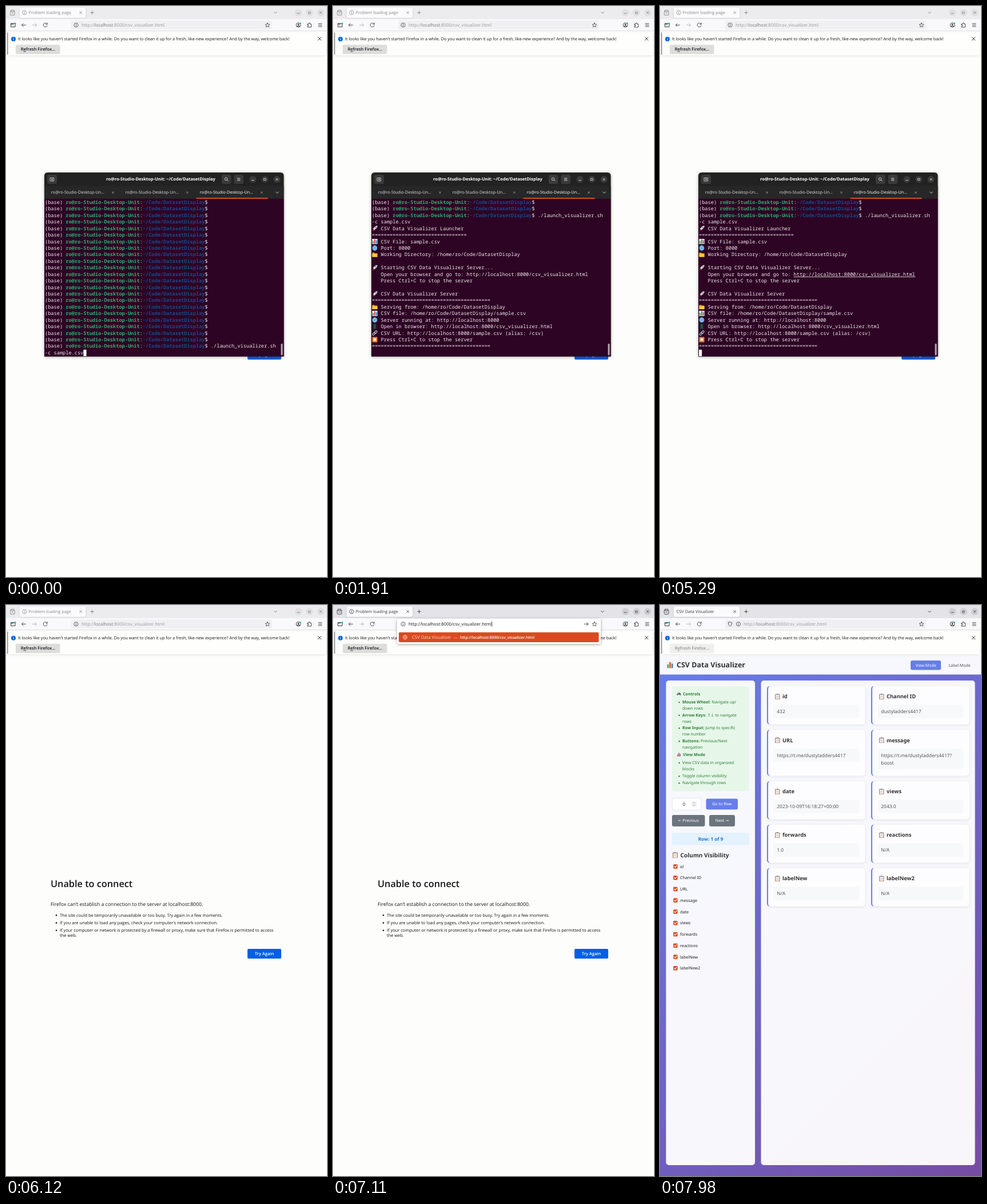
These frames come from a looping animation (561x998 px, 8 s). An HTML page:

```html
<!DOCTYPE html>
<html lang="en">
<head>
<meta charset="utf-8">
<title>CSV Data Visualizer</title>
<style>
html, body { margin: 0; width: 100%; height: 100%; overflow: hidden; background: #fdfdfb; }
svg { display: block; }
text { white-space: pre; text-rendering: geometricPrecision; font-family: "Open Sans", "Noto Sans", sans-serif; }
.mono text { font-family: "Noto Sans Mono", "DejaVu Sans Mono", monospace; }
.app text { font-family: "Noto Sans", "Open Sans", sans-serif; }
.arrow { font-family: "DejaVu Sans", sans-serif; }
</style>
</head>
<body>
<svg id="stage" width="561" height="998" viewBox="0 0 561 998">
  <defs>
    <linearGradient id="sky" gradientUnits="userSpaceOnUse" x1="-87" y1="176" x2="648" y2="911">
      <stop offset="0" stop-color="#667eea"/><stop offset="1" stop-color="#764ba2"/>
    </linearGradient>
    <filter id="soft" x="-10%" y="-10%" width="120%" height="125%">
      <feDropShadow dx="0" dy="1" stdDeviation="2.5" flood-opacity=".35"/>
    </filter>
    <filter id="faint" x="-10%" y="-10%" width="120%" height="130%">
      <feDropShadow dx="0" dy="1" stdDeviation="2" flood-opacity=".1"/>
    </filter>
    <symbol id="rocket" viewBox="0 0 10 10">
      <path d="M2.6 4 .8 5.8 3 6zM6 7.4 4.2 9.2 4 7z" fill="#d8343c"/>
      <path d="M9.6.4C6 .4 3.6 2.8 2.3 6.2L3.8 7.7C7.2 6.4 9.6 4 9.6.4z" fill="#cfd8dc"/>
      <circle cx="6.7" cy="3.3" r="1.1" fill="#2f7fb8"/>
      <path d="M2.6 7.2.6 9.5 3 8.2z" fill="#f9a825"/>
    </symbol>
    <symbol id="chart" viewBox="0 0 10 10">
      <rect x=".3" y=".3" width="9.4" height="9.4" rx=".6" fill="#eef2f4"/>
      <path d="M1.3 4h1.9v5H1.3z" fill="#3fa34d"/><path d="M4.1 1.2H6V9H4.1z" fill="#d9433b"/><path d="M6.9 3h1.9v6H6.9z" fill="#2c7fc4"/>
    </symbol>
    <symbol id="globe" viewBox="0 0 10 10">
      <circle cx="5" cy="5" r="4.5" fill="#2f8fd0"/>
      <path d="M.5 5h9M5 .5v9M1.3 2.7h7.4M1.3 7.3h7.4M5 .5C1.5 3 1.5 7 5 9.5 8.5 7 8.5 3 5 .5" fill="none" stroke="#bfe3f7" stroke-width=".6"/>
    </symbol>
    <symbol id="folder" viewBox="0 0 10 10">
      <path d="M.5 1.5H4l1 1.2h4.5V9h-9z" fill="#e0a21c"/><path d="M.5 3.8h9V9h-9z" fill="#ffca3a"/>
    </symbol>
    <symbol id="phone" viewBox="0 0 10 10">
      <rect x="2.3" y=".3" width="5.4" height="9.4" rx=".8" fill="#26363c"/><rect x="3" y="1.4" width="4" height="7" fill="#0b5c45"/>
    </symbol>
    <symbol id="link" viewBox="0 0 10 10">
      <g fill="none" stroke="#a9bac2" stroke-width="1.3" transform="rotate(-45 5 5)">
        <rect x="0" y="3.5" width="5.5" height="3" rx="1.5"/><rect x="4.5" y="3.5" width="5.5" height="3" rx="1.5"/>
      </g>
    </symbol>
    <symbol id="stop" viewBox="0 0 10 10">
      <rect x=".4" y=".4" width="9.2" height="9.2" rx="1" fill="#f57c1f"/><rect x="2.8" y="2.8" width="4.4" height="4.4" fill="#fff"/>
    </symbol>
    <symbol id="pad" viewBox="0 0 10 10">
      <path d="M2.5 2.5h5C9 2.5 10 8 8.7 8.2 7.7 8.3 7 6.5 6.5 6.5h-3C3 6.5 2.3 8.3 1.3 8.2 0 8 1 2.5 2.5 2.5z" fill="#56646b"/>
      <path d="M2 4.5h2M3 3.5v2" stroke="#fff" stroke-width=".6"/><circle cx="7" cy="4.5" r=".8" fill="#d9433b"/>
    </symbol>
    <symbol id="clip" viewBox="0 0 10 10">
      <rect x="1" y=".9" width="8" height="8.9" rx=".7" fill="#b5734c"/><path d="M2 2h6v7H2z" fill="#f4f6f7"/>
      <path d="M3.4.2h3.2v2H3.4z" fill="#8d9aa1"/><path d="M3 4h4M3 5.5h4M3 7h4" stroke="#9fb0b8" stroke-width=".5"/>
    </symbol>
  </defs>
</svg>
<script>
const LOOP = 8000;

const text = (x, cy, s, size, fill = "#15141a", more = "") =>
  `<text x="${x}" y="${cy + size * .35}" font-size="${size}" fill="${fill}" ${more}>${s}</text>`;
const box = (x, y, x2, y2, fill, r = 0, more = "") =>
  `<rect x="${x}" y="${y}" width="${x2 - x}" height="${y2 - y}" rx="${r}" fill="${fill}" ${more}/>`;
const dot = (x, y, r, fill, more = "") => `<circle cx="${x}" cy="${y}" r="${r}" fill="${fill}" ${more}/>`;
const line = (d, color = "#3b3b40", w = .9) =>
  `<path d="${d}" fill="none" stroke="${color}" stroke-width="${w}" stroke-linecap="round" stroke-linejoin="round"/>`;
const cross = (x, y, r, color, w) => line(`M${x - r} ${y - r}l${2 * r} ${2 * r}m0 ${-2 * r}l${-2 * r} ${2 * r}`, color, w);
const plus = (x, y, r, color) => line(`M${x - r} ${y}h${2 * r}M${x} ${y - r}v${2 * r}`, color);
const chevron = (x, y, color) => line(`M${x - 2.5} ${y - 1.2}l2.5 2.5 2.5-2.5`, color);
const arrow = (x, y, dir, color) => line(`M${x - 3.5 * dir} ${y}h${7 * dir}m${-2.8 * dir}-2.8l${2.8 * dir} 2.8 ${-2.8 * dir} 2.8`, color);
const icon = (id, x, cy, size) => `<use href="#${id}" x="${x}" y="${cy - size / 2}" width="${size}" height="${size}"/>`;
const info = (x, y, color) => dot(x, y, 3.6, "none", `stroke="${color}" stroke-width=".8"`) +
  line(`M${x} ${y - .3}v1.9M${x} ${y - 1.8}v.1`, color, .9);
const layer = (id, body, cls = "") => `<g id="${id}" class="${cls}">${body}</g>`;
const glyph = s => `<tspan class="arrow">${s}</tspan>`;
const MID = 'text-anchor="middle"', BOLD = 'font-weight="700"', SEMI = 'font-weight="600"', MEDIUM = 'font-weight="500"';

const INK = "#3b3b40", BLUE = "#667eea", ORANGE = "#da4a20";
const HOST = "localhost:8000", PAGE = `http://${HOST}/csv_visualizer.html`;

function star(x, y, r) {
  let d = "";
  for (let i = 0; i < 10; i++) {
    const a = Math.PI * (i / 5 - .5), q = i % 2 ? r * .48 : r;
    d += (i ? "L" : "M") + (x + q * Math.cos(a)).toFixed(2) + " " + (y + q * Math.sin(a)).toFixed(2);
  }
  return line(d + "z", INK, .8);
}

function errorPage() {
  const points = [[542, "The site could be temporarily unavailable or too busy. Try again in a few moments."],
    [555.3, "If you are unable to load any pages, check your computer’s network connection."],
    [568.5, "If your computer or network is protected by a firewall or proxy, make sure that Firefox is permitted to access"]];
  return text(78, 487.7, "Unable to connect", 16.3, "#15141a", SEMI) +
    text(78, 522.5, `Firefox can’t establish a connection to the server at ${HOST}.`, 8.64) +
    points.map(([y, s]) => dot(88, y + .3, 1.3, "#15141a") + text(94, y, s, 7.44)).join("") +
    text(94, 577.8, "the web.", 7.44) +
    box(422, 601, 481, 618, "#0060e4", 2) + text(451.5, 609.5, "Try Again", 7.5, "#fff", MID + " " + SEMI);
}

function visualizer() {
  const green = "#2e7d32";
  const help = [[169.7, "Mouse Wheel:", "Navigate up/"], [180.7, "", "down rows"],
    [192.5, "Arrow Keys:", glyph("↑↓") + " to navigate"], [203.5, "", "rows"],
    [215, "Row Input:", "Jump to specific"], [226, "", "row number"],
    [238, "Buttons:", "Previous/Next"], [249, "", "navigation"],
    [275.7, "-", "View CSV data in organized"], [287, "", "blocks"],
    [299, "-", "Toggle column visibility"], [311, "-", "Navigate through rows"]];
  const fields = ["id", "Channel ID", "URL", "message", "date", "views", "forwards", "reactions", "labelNew", "labelNew2"];
  const button = (x, y, x2, y2, s, fill) => box(x, y, x2, y2, fill, 3) +
    text((x + x2) / 2, (y + y2) / 2, s, 7.1, "#fff", MID + " " + MEDIUM);

  const side = box(10.5, 132, 166, 979, "#fff", 5, 'fill-opacity=".95"') +
    box(21, 142.5, 156, 325.5, "#e6f7ea", 3) +
    icon("pad", 29, 155.5, 8) + text(40, 155.5, "Controls", 7.2, green, BOLD) +
    icon("chart", 29, 261.5, 8) + text(40, 261.5, "View Mode", 7.2, green, BOLD) +
    help.map(([y, head, s]) => (head ? dot(33.5, y + .3, 1.2, green) : "") +
      text(39, y, (head.length > 1 ? `<tspan font-weight="700">${head}</tspan> ` : "") + s, 7.1, green)).join("") +
    box(21.3, 337.3, 72, 358.5, "#fff", 3, 'stroke="#dcdce4" stroke-width=".7"') +
    text(42, 348, "0", 7.6, "#222", MID) +
    box(55, 343, 64, 353, "#f0f0f2", 1) + line("M58 346.5l1.5-1.5 1.5 1.5M58 349.5l1.5 1.5 1.5-1.5", "#8a8a90", .7) +
    button(80.5, 338.5, 136, 357.5, "Go to Row", BLUE) +
    button(21, 367, 78.5, 387, glyph("←") + " Previous", "#6c757d") +
    button(86, 367, 131, 387, "Next " + glyph("→"), "#6c757d") +
    box(21, 398, 156, 419.5, "#e3f2fd", 3) + text(88.5, 408.7, "Row: 1 of 9", 8.2, "#1976d2", MID + " " + BOLD) +
    icon("clip", 21, 437, 11) + text(35.5, 437, "Column Visibility", 10.1, "#333", BOLD);

  const checks = fields.map((name, i) => {
    const y = 457 + i * 19.75;
    return box(23.3, y - 3.7, 30.7, y + 3.7, ORANGE, 1.2) +
      line(`M25 ${y}l1.5 1.6 2.7-3.2`, "#fff", 1.1) + text(35, y, name, 7.2, "#222");
  }).join("");

  const link = "https://t.me/dustyladders4417";
  const values = [["432"], ["dustyladders4417"], [link], [link + "?", "boost"],
    ["2023-10-09T16:18:27+00:00"], ["2043.0"], ["1.0"], ["N/A"], ["N/A"], ["N/A"]];
  const tops = [142, 218.3, 308, 384, 460];
  const cards = values.map((rows, i) => {
    const x = i % 2 ? 369 : 187, r = i >> 1, y = tops[r], h = r === 1 ? 80 : 66.5;
    return box(x + 1, y, x + 171.5, y + h, "#fdfdff", 5, 'filter="url(#faint)"') +
      `<path d="M${x + 5} ${y}q-5 0-5 5v${h - 10}q0 5 5 5-3-1-3-5V${y + 5}q0-4 3-5z" fill="${BLUE}"/>` +
      icon("clip", x + 13, y + 18, 10.5) + text(x + 27, y + 18, fields[i], 9.3, "#333", BOLD) +
      box(x + 11.5, y + 32.5, x + 161, y + 43 + 13 * rows.length, "#f7f8fa", 2) +
      rows.map((s, k) => text(x + 17.3, y + 44.3 + 13.3 * k, s, 8.4, "#555")).join("");
  }).join("");

  return box(0, 89, 561, 998, "url(#sky)") + box(0, 89, 561, 121.5, "#fff", 0, 'fill-opacity=".95"') +
    icon("chart", 11, 105, 13) + text(29, 105, "CSV Data Visualizer", 12.5, "#333", BOLD) +
    box(438, 97, 491, 113.5, BLUE, 3) + text(464.7, 105.2, "View Mode", 7, "#fff", MID + " " + MEDIUM) +
    text(523.5, 105.2, "Label Mode", 7, "#495057", MID) +
    side + layer("checks", checks) +
    box(176.5, 132, 550.5, 979, "#fff", 5, 'fill-opacity=".95"') + layer("cards", cards);
}

function browser() {
  const strip = line("M7.5 9.5H15V15a1 1 0 0 1-1 1H8.5a1 1 0 0 1-1-1zM8.5 9.5V7.3H14v2.2M10 12.2h2.5", INK, .9) +
    layer("oldTab", info(32.5, 11.5, INK) + text(39.5, 11.5, "Problem loading page", 7.31, INK)) +
    layer("newTab", text(28.5, 11.5, "CSV Data Visualizer", 7.45, INK)) +
    cross(130.7, 11.5, 1.9, INK) + plus(150.5, 11.5, 2.8, INK) + chevron(471, 11.5, INK) +
    [511, 530.5, 550].map(x => dot(x, 11.5, 6.3, "#000", 'fill-opacity=".09"')).join("") +
    line("M509 13h4", INK) + line("M529 10.3h3v3h-3z", INK, .8) + cross(550, 11.5, 1.8, INK);

  const nav = line("M9 30.5h7v6H9zM9 32h4", INK, 1) + dot(16, 30.5, 1.5, "#17b6b0") +
    arrow(31, 33.3, -1, INK) + arrow(50, 33.3, 1, "#b4b4ba") +
    line("M71.7 31.5a3.5 3.5 0 1 0 .3 2.8M72.2 29.7V32h-2.3", INK) +
    dot(511, 33.3, 3.9, "none", `stroke="${INK}" stroke-width=".9"`) + dot(511, 32.2, 1.3, INK) +
    line("M508.9 35.6q2.1-2 4.2 0", INK, 1.2) + dot(514.5, 30.2, 1.3, "#17b6b0") +
    line("M527 31.5h2.2q-.5-2.3 1.1-2.3t1.1 2.3h2.1V37H527v-1.9q2 .3 2-1t-2-1z", INK) +
    line("M546 30.7h6M546 33.3h6M546 35.9h6", INK);

  const welcome = "It looks like you haven’t started Firefox in a while. Do you want to clean it up for a fresh, like-new experience? And by the way, welcome back!";
  const bar = box(2.5, 46.5, 559, 86, "#fefefc", 2, 'filter="url(#faint)"') + box(2.2, 46.5, 3.4, 85, "#6a6a70") +
    dot(13, 57.7, 4, "#0060df") + line("M13 57.3v2.2M13 55.5v.1", "#fff", 1) +
    text(21, 57.5, welcome, 7.31) + cross(548, 57.2, 2.7, "#15141a", .9) +
    layer("refresh", box(17, 67.7, 94.5, 84, "#dddddc", 2) +
      text(56, 75.8, 'R<tspan text-decoration="underline">e</tspan>fresh Firefox…', 7.5, "#15141a", MID + " " + SEMI));

  const url = `http://<tspan fill="#77777c">localhost</tspan>:8000/csv_visualizer.html`;
  return box(0, 0, 561, 23, "#ececee") + layer("active", box(0, 0, 561, 23, "#e4e4e8")) +
    box(24, 2.8, 139, 20.5, "#fbfbfd", 2.5, 'filter="url(#faint)"') + layer("strip", strip) +
    box(0, 23, 561, 44, "#f9f9fb") + box(0, 43.3, 561, 44, "#d4d4d8") + nav + bar +
    box(114, 25.5, 465, 41.2, "#f0f0f3", 2.5) +
    layer("urlOld", info(122.5, 33.3, INK) + text(132, 33.3, url, 7.75, "#98989d")) +
    layer("urlNew", line("M122.5 29.7l3.3 1.2q0 4.6-3.3 6.2-3.3-1.6-3.3-6.2z", INK) +
      info(137, 33.3, INK) + text(146, 33.3, url, 7.75, "#98989d")) +
    star(457, 33.5, 4.1);
}

const urlField = () => layer("focusBox", box(112, 24, 468, 43, "#fff", 3, 'filter="url(#soft)"')) +
  layer("drop", box(112, 24, 468, 68, "#fff", 3, 'filter="url(#soft)"') + box(115, 47.7, 464.5, 65, ORANGE, 2) +
    dot(126, 56.3, 3.6, "none", 'stroke="#ffd9cc" stroke-width=".7"') +
    line("M122.4 56.3h7.2M126 52.7q-3 3.6 0 7.2M126 52.7q3 3.6 0 7.2", "#ffd9cc", .6) +
    text(138, 56.3, "CSV Data Visualizer", 7.7, "#ffd5c8") + text(211, 56.3, "—", 7, "#ffd5c8") +
    text(222, 56.3, PAGE, 6.7, "#fff", SEMI)) +
  info(122.5, 33.3, INK) + text(132, 33.3, PAGE, 7.75) + line("M277.8 29v8.6", "#15141a", .7) +
  arrow(442.5, 33.3, 1, INK) + star(457, 33.5, 4.1);

// Terminal
const COL = 5.18, ROW = 11.43, LEFT = 68, TOP = 343, ROWS = 24;
const USER = "ro", MACHINE = "ro-Studio-Desktop-Unit", DIR = "/home/ro/Code/DatasetDisplay";
const rule = n => ["", "=".repeat(n)];
const OUTPUT = [
  ["rocket", "CSV Data Visualizer Launcher"], rule(32),
  ["chart", "CSV File: sample.csv"], ["globe", "Port: 8000"], ["folder", "Working Directory: " + DIR],
  ["", ""], ["rocket", "Starting CSV Data Visualizer Server..."],
  ["", "   Open your browser and go to: " + PAGE], ["", "   Press Ctrl+C to stop the server"],
  ["", ""], ["rocket", "CSV Data Visualizer Server"], rule(40),
  ["folder", "Serving from: " + DIR], ["chart", `CSV file: ${DIR}/sample.csv`],
  ["globe", `Server running at: http://${HOST}`], ["phone", "Open in browser: " + PAGE],
  ["link", `CSV URL: http://${HOST}/sample.csv (alias: /csv)`], ["stop", "Press Ctrl+C to stop the server"], rule(40)];
// [time, output lines printed so far]
const PRINTED = [[0, 0], [1270, 2], [1300, 3], [1340, 4], [1400, 5], [1620, 7], [1650, 10], [1810, 19]];

function terminal() {
  const tab = (x, s, color) => text(x, 325.7, s, 7.29, color) + cross(x + 108.3, 326, 1.6, "#a8a8a8", .7);
  const label = `${USER}@${MACHINE.slice(0, 20)}…`, pale = "#e0e0e0";
  return `<path d="M67 612.5V297q0-6 6-6h406.5q6 0 6 6v315.5z" fill="#232323" filter="url(#soft)"/>` +
    box(67, 314.5, 485.5, 336.5, "#272727") +
    box(72, 295, 89, 311, "#3a3a3a", 3) + box(377, 295, 393.5, 311, "#3a3a3a", 3) + box(398.5, 295, 415, 311, "#3a3a3a", 3) +
    line("M77.5 300.5h6v5.5h-6zM80.5 302v2.5M79.3 303.2h2.5", pale, .8) +
    dot(384.6, 302.4, 2.3, "none", `stroke="${pale}" stroke-width=".9"`) + line("M386.4 304.2l1.8 1.8", pale) +
    line("M404.5 301h4.5M404.5 303h4.5M404.5 305h4.5", pale, .8) +
    [431.5, 452.5, 473.5].map(x => dot(x, 303, 6, "#3a3a3a")).join("") +
    line("M429.7 304.7h3.6", pale) + line("M450.9 301.4h3.2v3.2h-3.2z", pale, .8) + cross(473.5, 303, 1.7, pale) +
    text(270.5, 302.7, `${USER}@${MACHINE}: ~/Code/DatasetDisplay`, 7.5, "#fff", MID + " " + BOLD) +
    tab(78.7, label, "#dedede") + tab(208.5, label, "#dedede") + tab(338.7, label, "#fff") + chevron(474, 326, pale) +
    box(67, 337, 485.5, 612.5, "#2e0424") + box(332.5, 335, 457.5, 337, "#d9481c") +
    layer("screen", "", "mono") + box(480.5, 590, 483.5, 610.5, "#b3a9b0", 1.5) +
    layer("caret", box(0, 600.7, COL, 612, "#fff"));
}

function screen(count) {
  const prompt = `(base) <tspan font-weight="700" fill="#2bb070">${USER}@${MACHINE}</tspan>:` +
    `<tspan font-weight="700" fill="#174b8c">~/Code/DatasetDisplay</tspan>$ `;
  const rows = [["", prompt + "./launch_visualizer.sh"], ["", "-c sample.csv"], ...OUTPUT.slice(0, count)];
  if (count) rows.push(["", ""]);
  while (rows.length < ROWS) rows.unshift(["", prompt]);
  return rows.map(([mark, s], i) => {
    const y = TOP + i * ROW;
    return (mark ? icon(mark, LEFT, y, 10) : "") + text(LEFT + (mark ? 3 * COL : 0), y, s, COL / .6, "#efebee");
  }).join("") +
    layer("linkTop", box(LEFT + 32 * COL, 473.2, LEFT + 73 * COL, 474, "#efebee")) +
    layer("linkLow", box(LEFT + 20 * COL, 565, LEFT + 61 * COL, 565.8, "#efebee"));
}

const stage = document.getElementById("stage");
stage.insertAdjacentHTML("beforeend", box(0, 0, 561, 998, "#fdfdfb") + layer("error", errorPage()) +
  layer("app", visualizer(), "app") + layer("browser", browser()) + layer("field", urlField()) + layer("term", terminal()));

const $ = id => document.getElementById(id);
const show = (id, on) => $(id).setAttribute("display", on ? "inline" : "none");
const within = (t, a, b) => t >= a && t < b;
let printed = -1;

function draw(t) {
  const count = PRINTED.filter(p => p[0] <= t).pop()[1];
  if (count !== printed) {
    $("screen").innerHTML = screen(count);
    printed = count;
  }
  show("term", t < 6080);
  show("caret", within(t, 0, 400) || (t >= 1010 && (t - 70) % 1200 < 600));
  $("caret").setAttribute("transform", `translate(${LEFT + (count ? 0 : 13 * COL)} 0)`);
  show("linkTop", within(t, 2750, 2820) || within(t, 5290, 5400));
  show("linkLow", within(t, 4030, 4580) || within(t, 4660, 4810));

  const focus = Math.min(1, Math.max(0, (t - 6160) / 200));
  $("active").setAttribute("opacity", focus);
  $("strip").setAttribute("opacity", .6 + .4 * focus);
  show("field", within(t, 6620, 7610));
  show("focusBox", t < 6810);
  show("drop", t >= 6810);

  const loaded = t >= 7740;
  show("error", t < 7680);
  show("app", loaded);
  show("checks", t >= 7860);
  show("cards", t >= 7860);
  show("oldTab", !loaded);
  show("newTab", loaded);
  show("urlOld", !loaded);
  show("urlNew", loaded);
  $("refresh").setAttribute("opacity", loaded ? .45 : 1);
}

function tick() {
  draw(performance.now() % LOOP);
  requestAnimationFrame(tick);
}
tick();
</script>
</body>
</html>
```
